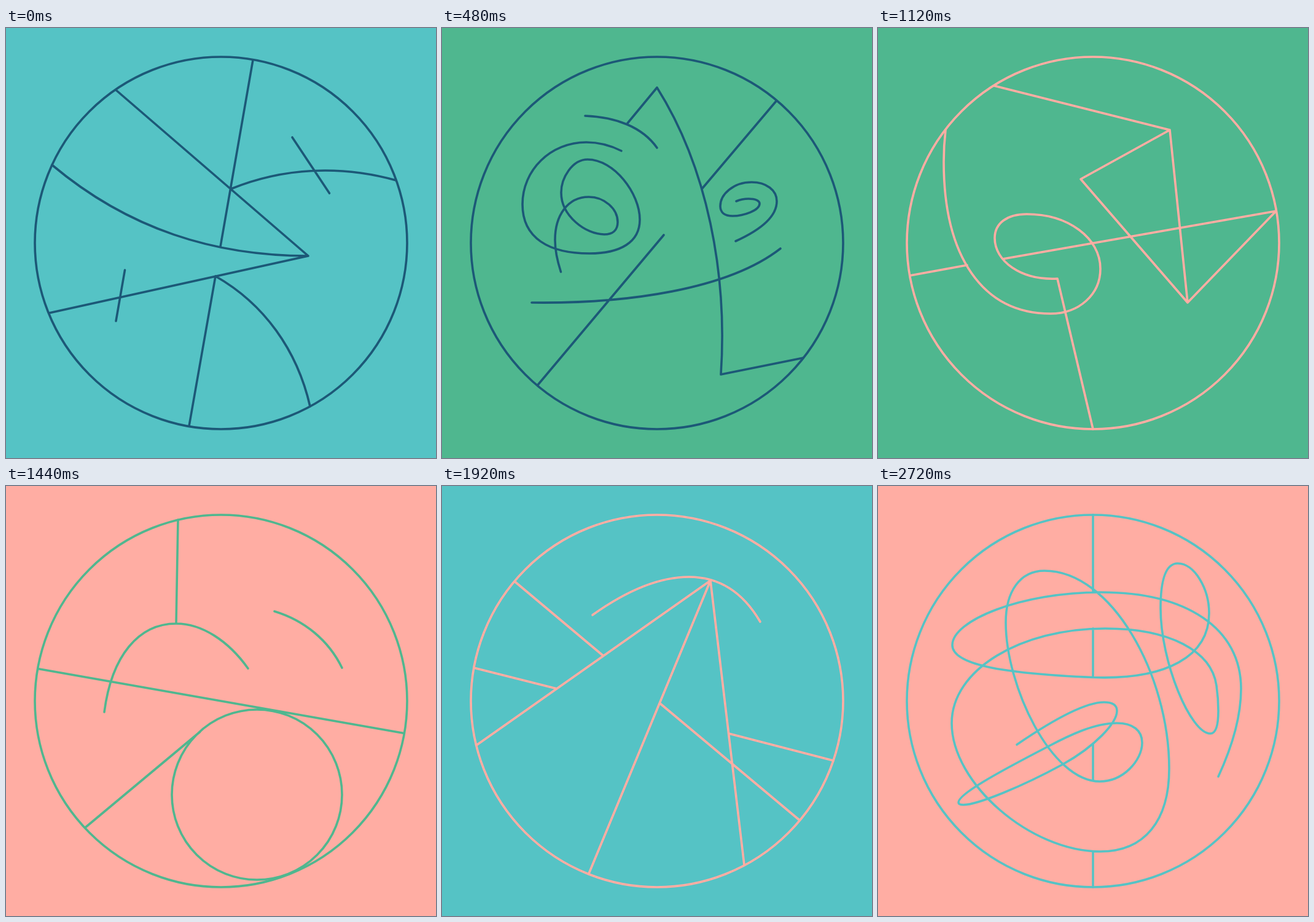
An HTML page with a canvas for the animation above (2880 ms loop, 700 by 700 pixels).

```html
<!DOCTYPE html>
<html lang="en">
<head>
<meta charset="utf-8">
<title>Line drawings</title>
<style>
html, body { margin: 0; width: 100%; height: 100%; overflow: hidden; }
canvas { display: block; width: 100vw; height: 100vh; }
</style>
</head>
<body>
<canvas id="stage" width="700" height="700"></canvas>
<script>
const ctx = document.getElementById('stage').getContext('2d');
const STEP = 160;

const teal = '#55c3c5', green = '#4fb78f', pink = '#ffada3', navy = '#1c5877';

const fan = new Path2D(`
  M179 101 L492 371 L70 464 M402 52 L349 356 M341 404 L298 648
  M466 178 L526.5 269 M193.5 394 L179 477
  M75 223 C200 328 340 371 492 371
  M366 262 C452 227 545 223 635 248
  M341 404 C420 449 474 524 495 616`);

const spirals = new Path2D(`
  M302 155 L350 97 C432 227 465 400 454 564 L588 537
  M544 119 L423 262 M361 337 L156 581
  M233 143 C283 145 326 161 350 195
  M146 447 C300 449 465 426 551 359
  M292 200 C274 191 255 186 235 186 C177 186 131 231 131 287
  C131 342 174 367 240 367 C290 367 322 349 322 312
  C322 269 280 214 237 214 C212 214 194 244 194 268
  C194 306 234 336 264 336 C278 336 286 329 286 316
  C286 294 264 275 239 275 C204 275 184 306 184 345
  C184 362 188 380 193.5 397
  M479 282 C486 279 492 278 499 278 C510 278 517 281 517 286
  C517 297 491 306 473 306 C460 306 453 300 453 290
  C453 271 474 251 504 251 C528 251 545 264 545 282
  C545 307 520 328 478 347`);

const kite = new Path2D(`
  M189 94 L475 166 L504 447 L648 298 L203 376
  M475 166 L330 246 L504 447 M52 403 L145 386
  M110 166 C108 183 107 200 107 218 C107 372 170 465 281 465
  C327 465 362 434 362 392 C362 342 310 303 242 303
  C210 303 190 318 190 342 C190 379 232 411 292 408 L350 653`);

const ball = new Path2D(`
  M280 55 L277 223 M52 297.5 L648 402.5 M129 556 L316 400
  M160 368 C172 276 216 224 277 224 C319 224 362 252 394 297
  M437 204 C486 219 525 251 547 296
  M547 502.5 A138.5 138.5 0 1 1 270 502.5 A138.5 138.5 0 1 1 547 502.5`);

const rays = new Path2D(`
  M56 422 L437 154 L239 631 M437 154 L492 617
  M119 156 L262 276 M52 296 L187 330 M355 354 L582 544 M467 403 L637 447
  M245 210 C304 168 355 148 402 148 C452 148 490 173 518 221`);

const zigzag = new Path2D(`
  M411 54 L170 263 L312 523 L534 110 L634 453
  M247 66 L372 410 M312 523 L580 546 M417 533 L454 634
  M163 387 C222 388 277 374 302 348`);

const scribble = new Path2D(`
  M350 47 V171 M350 232 V311 M350 419 V479 M350 595 V653
  M554 473 C578 421 591 375 591 330 C591 232 503 173 363 173
  C233 173 121 219 121 259 C121 290 198 305 350 311.5
  C470 316 539 277 539 207 C539 167 515 126 488 126
  C468 126 460 155 460 199 C460 287 509 403 541 403
  C551 403 554 388 554 366 C554 354 553 339 551 325
  C543 268 474 232 370 232 C232 232 120 299 120 386
  C120 484 248 595 362 595 C434 595 474 545 474 460
  C474 307 380 138 271 138 C231 138 208 172 208 222
  C208 326 282 481 361 481 C399 481 430 447 430 418
  C430 398 415 386 389 386 C352 386 311 406 277 424
  C190 469 131 502 131 515 C131 518 134 519 139 519
  C162 519 235 489 301 453 C353 424 389 386 389 366
  C389 357 382 352 368 352 C336 352 283 382 226 421`);

// One entry per step: drawing, background, line
const cards = [
  [fan, teal, navy],
  [rays, pink, green],
  [scribble, teal, pink],
  [spirals, green, navy],
  [zigzag, teal, navy],
  [fan, pink, teal],
  [ball, teal, pink],
  [kite, green, pink],
  [scribble, teal, navy],
  [ball, pink, green],
  [spirals, green, pink],
  [zigzag, pink, teal],
  [rays, teal, pink],
  [kite, green, navy],
  [fan, pink, green],
  [zigzag, green, pink],
  [spirals, teal, navy],
  [scribble, pink, teal]
];

function draw([shape, back, line]) {
  ctx.fillStyle = back;
  ctx.fillRect(0, 0, 700, 700);
  ctx.strokeStyle = line;
  ctx.lineWidth = 3.6;
  ctx.lineCap = ctx.lineJoin = 'round';
  ctx.stroke(shape);
  ctx.beginPath();
  ctx.arc(350, 350, 303, 0, Math.PI * 2);
  ctx.stroke();
}

let start;
function tick(now) {
  start ??= now;
  draw(cards[Math.floor((now - start) / STEP) % cards.length]);
  requestAnimationFrame(tick);
}
draw(cards[0]);
requestAnimationFrame(tick);
</script>
</body>
</html>
```
